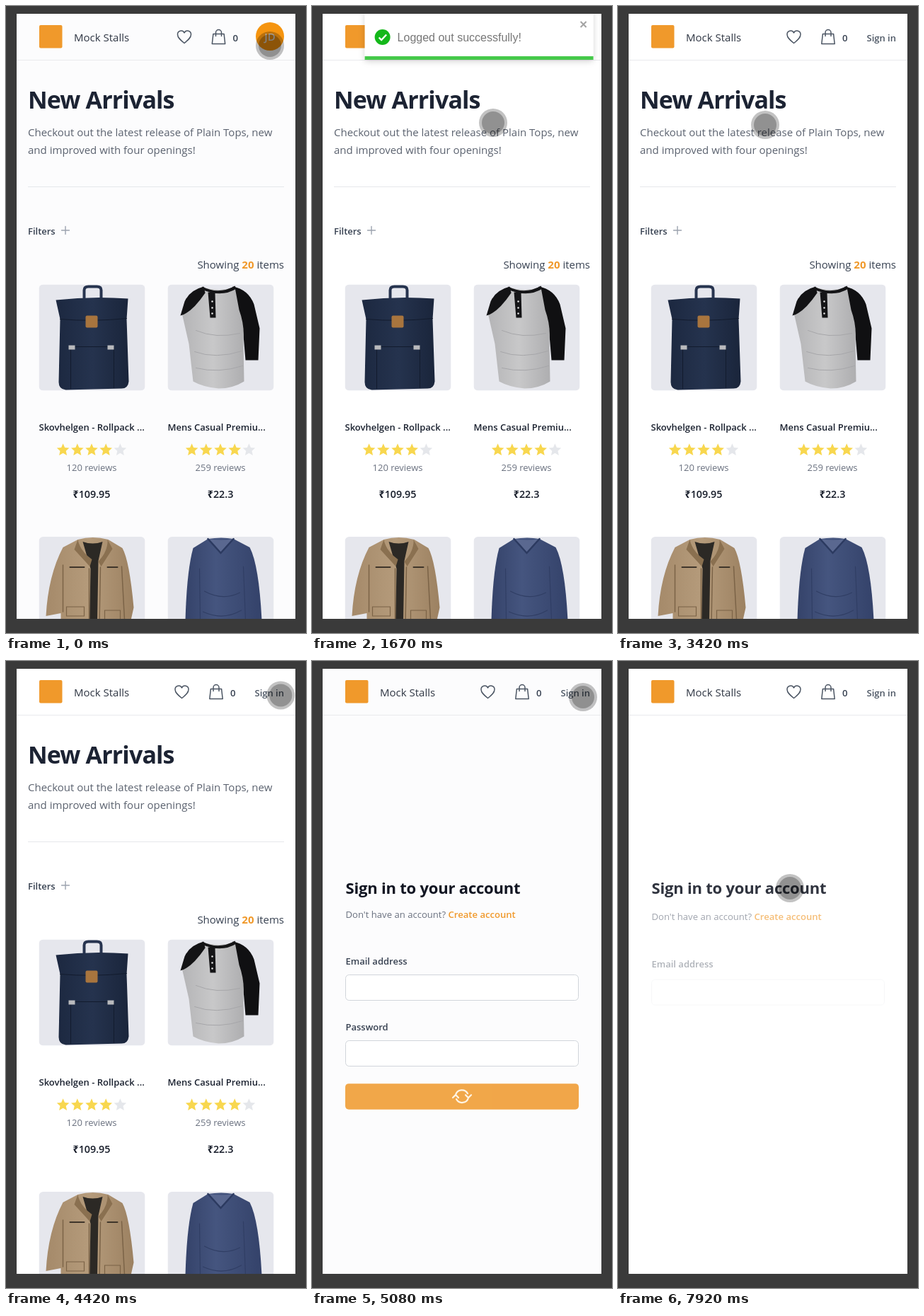
Write an HTML page that moves like this. It is 424 px wide and 886 px high and loops after 8 s.

```html
<!DOCTYPE html>
<html lang="en">
<head>
<meta charset="utf-8">
<title>Shop sign-in flow</title>
<style>
html, body { margin: 0; width: 100%; height: 100%; overflow: hidden; background: #3a3a3a; }
svg { display: block; width: 100%; height: 100%; }
text { font-family: "Open Sans", "Noto Sans", sans-serif; fill: #374151; white-space: pre; }
.semi { font-weight: 600; }
.bold { font-weight: 700; }
.mid { text-anchor: middle; }
.end { text-anchor: end; }
.line { fill: none; stroke: #4b5563; stroke-width: 1.5; stroke-linecap: round; stroke-linejoin: round; }
</style>
</head>
<body>
<svg id="stage" viewBox="0 0 424 886" preserveAspectRatio="none">
  <defs>
    <clipPath id="screen"><rect x="15" y="11" width="394" height="855"/></clipPath>
    <clipPath id="card"><rect width="150" height="150" rx="6"/></clipPath>
    <filter id="soft" x="-10%" y="-30%" width="120%" height="170%">
      <feDropShadow dx="0" dy="2" stdDeviation="4" flood-opacity=".18"/>
    </filter>
    <linearGradient id="tan"><stop stop-color="#a58a6a"/><stop offset=".5" stop-color="#b59b7b"/><stop offset="1" stop-color="#9c8161"/></linearGradient>
    <linearGradient id="grey"><stop stop-color="#b4b4b6"/><stop offset=".5" stop-color="#c8c8c9"/><stop offset="1" stop-color="#aeaeb0"/></linearGradient>
    <linearGradient id="blue"><stop stop-color="#35436a"/><stop offset=".4" stop-color="#45557f"/><stop offset="1" stop-color="#34426a"/></linearGradient>
    <linearGradient id="navy"><stop stop-color="#1c2840"/><stop offset=".5" stop-color="#25334e"/><stop offset="1" stop-color="#1a253b"/></linearGradient>
  </defs>
  <g clip-path="url(#screen)">
    <rect id="page" x="15" y="11" width="394" height="855" fill="#fff"/>
    <g id="home"></g>
    <g id="signIn"></g>
    <g id="signUp"></g>
    <g id="header"></g>
    <g id="menu"></g>
    <g id="toast"></g>
    <g id="loading"></g>
  </g>
  <g id="pointer">
    <circle r="20" fill="#000" opacity=".24"/>
    <circle r="16" fill="#000" opacity=".25"/>
  </g>
</svg>
<script>
const LOOP = 8000;
const ORANGE = '#f0992b';
const $ = id => document.getElementById(id);
const clamp = v => Math.max(0, Math.min(1, v));
const span = (t, from, to) => clamp((t - from) / (to - from));
const between = (t, from, to) => t >= from && t < to;
const show = (el, on) => el.setAttribute('display', on ? 'inline' : 'none');
const move = (el, x, y) => el.setAttribute('transform', `translate(${x} ${y})`);
const smooth = p => p * p * (3 - 2 * p);
const easeOut = p => 1 - (1 - p) ** 3;

// Interpolates rows of [time, ...values]
function follow(rows, t, ease) {
  const next = rows.findIndex(row => row[0] > t);
  if (next < 0) return rows[rows.length - 1].slice(1);
  if (next === 0) return rows[0].slice(1);
  const a = rows[next - 1], b = rows[next];
  const p = ease(span(t, a[0], b[0]));
  return a.slice(1).map((v, i) => v + (b[i + 1] - v) * p);
}

const text = (x, y, size, label, cls = '', fill = '#374151', extra = '') =>
  `<text x="${x}" y="${y}" font-size="${size}" class="${cls}" style="fill:${fill}" ${extra}>${label}</text>`;
const path = (d, fill, extra = '') => `<path d="${d}" fill="${fill}" ${extra}/>`;
const stroke = (d, color, width = 1) =>
  `<path d="${d}" fill="none" stroke="${color}" stroke-width="${width}" stroke-linecap="round"/>`;

// Header
const heart = 'M0 9C-5 5-9.5 1.5-9.5-3.2A5 5 0 0 1 0-5.6 5 5 0 0 1 9.5-3.2C9.5 1.5 5 5 0 9Z';
const bag = 'M-7.6-4.5H7.6L9.2 9.5H-9.2ZM-4-1.5V-6.5A4 4 0 0 1 4-6.5V-1.5';
$('header').innerHTML = `
  <path d="M15 76.5H409" stroke="#e9eaed"/>
  <rect x="47" y="27" width="32.5" height="32.5" rx="2" fill="${ORANGE}"/>
  ${text(96, 50, 15, 'Mock Stalls', '', '#303744')}
  <g id="icons">
    <path class="line" d="${heart}" transform="translate(248.5 43.5)"/>
    <path class="line" d="${bag}" transform="translate(297 44)"/>
    ${text(317, 49.5, 13.2, '0', 'semi')}
  </g>
  <g id="avatar">
    <circle cx="373" cy="43" r="20" fill="#f5940f"/>
    ${text(373, 49, 15, 'JD', 'mid semi', '#e4e0da')}
  </g>
  <g id="signLink">${text(393, 49.5, 13, 'Sign in', 'end semi', '#4b5563')}</g>`;

// Products
const backpack = `
  ${stroke('M64 19V8Q64 3 70 3H82Q88 3 88 8V19', '#27344f', 4)}
  ${path('M24 22Q75 16 126 20L124 49 127 137Q126 147 117 147L38 149Q28 148 28 138L30 49Z', 'url(#navy)')}
  ${stroke('M30 49Q75 53 124 48M45 88H106V146M45 88V147', '#121b2d')}
  ${path('M42 86h9v6h-9ZM97 86h9v6h-9Z', '#b9babd')}
  <rect x="66" y="44" width="17" height="17" rx="2" fill="#a8753e"/>`;
const raglan = `
  ${path('M92 3Q114 7 122 28L130 62 128 107 110 107 106 60 97 38Z', '#101012')}
  ${path('M50 4Q72 11 95 4L101 36Q109 58 107 80L108 137Q92 147 72 147 50 145 36 137L30 84 20 40 28 20Z', 'url(#grey)')}
  ${path('M51 3Q31 8 24 24L18 44Q34 40 53 12Z', '#131315')}
  ${path('M49 3Q72 15 95 2L97 6Q76 19 48 7ZM57 11h10L68 47H60Z', '#151517')}
  ${stroke('M40 65Q68 77 102 69M38 95Q68 106 105 94M40 118Q72 126 106 115', '#a6a6a9')}
  <g fill="#eee"><circle cx="63" cy="24" r="1.2"/><circle cx="63" cy="33" r="1.2"/><circle cx="63" cy="41" r="1.2"/></g>`;
const jacket = `
  ${path('M55 4Q76-2 98 4L118 16Q128 34 134 100L130 118H121V150H31V108L10 112Q13 55 34 15Z', 'url(#tan)')}
  ${path('M62 7Q76 12 90 7L84 34 82 150H71L73 45Z', '#2c2925')}
  ${path('M55 4Q58 20 75 32L72 42 50 18ZM97 4Q98 20 84 35L88 42 104 17Z', '#8a7050')}
  ${stroke('M34 40V106M117 42L121 117M71 45V150M87 43L85 150', '#7b6347', 1.5)}
  ${stroke('M44 43H64M97 43H111', '#3f352a', 2)}
  ${stroke('M39 99H64V112H39ZM93 104H115V117H93Z', '#7b6347', 1.2)}`;
const tee = `
  ${path('M57 3Q76 0 93 3L116 15Q129 40 133 118H25Q27 48 36 16Z', 'url(#blue)')}
  ${path('M58 3Q76 6 92 3L75 22Z', '#5a6890')}
  ${stroke('M57 3L75 23 93 3', '#2c3a60', 2.5)}
  ${stroke('M45 45L46 118M107 42L110 118M52 77Q78 91 102 79M50 106Q78 119 104 104', '#303e64', 1.2)}`;
const photo = (x, y, art) =>
  `<g transform="translate(${x} ${y})" clip-path="url(#card)"><rect width="150" height="150" fill="#e6e7ed"/>${art}</g>`;

const starPath = Array.from({ length: 10 }, (_, i) => {
  const r = i % 2 ? 4.3 : 9.3, a = Math.PI * (i / 5 - .5);
  return `${i ? 'L' : 'M'}${(r * Math.cos(a)).toFixed(1)} ${(r * Math.sin(a)).toFixed(1)}`;
}).join('') + 'Z';
const stars = cx => [0, 1, 2, 3, 4].map(i =>
  path(starPath, i < 4 ? '#f8d74f' : '#e5e7eb', `transform="translate(${cx + (i - 2) * 20.2} 627.5)"`)).join('');
const product = (x, art, name, reviews, price) => `
  ${photo(x, 393.5, art)}
  ${text(x, 600, 13, name, 'semi', '#1b2230')}
  ${stars(x + 74.5)}
  ${text(x + 74.5, 657, 13, reviews + ' reviews', 'mid', '#6b7280')}
  ${text(x + 74.5, 695, 14.3, '₹' + price, 'mid semi', '#151b28')}`;

$('home').innerHTML = `
  ${text(31, 145, 34, 'New Arrivals', 'bold', '#1c2333', 'letter-spacing="-.85"')}
  ${text(31, 184, 15, 'Checkout out the latest release of Plain Tops, new', '', '#5b626f')}
  ${text(31, 209, 15, 'and improved with four openings!', '', '#5b626f')}
  <path d="M31 255.5H393" stroke="#e5e7eb"/>
  ${text(31, 323, 13, 'Filters', 'semi')}
  ${stroke('M78.5 317H89.5M84 311.5V322.5', '#9ca3af', 1.4)}
  ${text(393, 371, 15, `Showing <tspan class="bold" style="fill:${ORANGE}">20</tspan> items`, 'end')}
  ${product(46.5, backpack, 'Skovhelgen - Rollpack ...', 120, '109.95')}
  ${product(228.5, raglan, 'Mens Casual Premiu...', 259, '22.3')}
  ${photo(46.5, 750, jacket)}
  ${photo(228.5, 750, tee)}`;

// Account forms: rows fade and slide in one after another
const STAGGER = 42, FADE = 180;
const field = y => `<rect x="47.5" y="${y}" width="329" height="36" rx="5" fill="#fff" stroke="#d1d5db"/>`;
const label = (y, name) => text(47.5, y, 13, name, 'semi');
const spinner = `<g class="spinner" fill="none" stroke="#fff3df" stroke-width="2.2" stroke-linecap="round" stroke-linejoin="round">
  <path d="M-9-2A9.2 9.2 0 0 1 8-4M9 2A9.2 9.2 0 0 1-8 4M-13 2L-9-2-5 2M13-2L9 2 5-2"/></g>`;

function buildForm(id, top, title, hint, link, names, action) {
  const rows = [
    text(47.5, top + 8, 22, title, 'bold', '#111522', 'letter-spacing="-.2"'),
    text(47.5, top + 42, 13.1, `${hint} <tspan class="semi" style="fill:${ORANGE}">${link}</tspan>`, '', '#6b7280'),
  ];
  names.forEach((name, i) => {
    const y = top + 93 * i;
    rows.push(label(y + 107.5, name), field(y + 122.5));
  });
  const y = top + 93 * names.length + 89;
  rows.push(`<rect x="47" y="${y}" width="330" height="36.5" rx="5" fill="${ORANGE}"/>
    <g class="action">${text(212, y + 23, 13, action, 'mid semi', '#fff')}</g>${spinner}`);
  $(id).innerHTML = rows.map(row => `<g>${row}</g>`).join('');
  const nodes = [...$(id).children];
  const spin = $(id).querySelector('.spinner'), caption = $(id).querySelector('.action');
  return (t, start, end, busyUntil) => {
    const on = between(t, start, end);
    show($(id), on);
    if (!on) return;
    nodes.forEach((node, i) => {
      const p = span(t - start - STAGGER * i, 0, FADE);
      node.setAttribute('opacity', p);
      move(node, 0, (i ? 8 : -3) * (1 - p));
    });
    const busy = t < busyUntil;
    show(spin, busy);
    show(caption, !busy);
    spin.setAttribute('transform', `translate(212 ${y + 18}) rotate(${(t - 5080) * .36})`);
  };
}
const drawSignIn = buildForm('signIn', 321, 'Sign in to your account', "Don't have an account?",
  'Create account', ['Email address', 'Password'], 'Sign in');
const drawSignUp = buildForm('signUp', 277, 'Create your account', 'Already have an account?',
  'Sign in', ['Full name', 'Email address', 'Password'], 'Create account');

// Overlays
$('menu').innerHTML = `<rect x="201" y="71" width="192" height="116" rx="6" fill="#fff" filter="url(#soft)"/>
  ${['Your Profile', 'Settings', 'Sign out'].map((s, i) => text(217, 98 + 36 * i, 13.1, s)).join('')}`;

$('toast').innerHTML = `
  <rect x="70" y="5" width="323" height="71" rx="3" fill="#fff" filter="url(#soft)"/>
  <circle cx="95" cy="44" r="11" fill="#14b81a"/>
  <path d="M90 44.5L93.5 48 100.5 40.5" fill="none" stroke="#fff" stroke-width="2.4"/>
  <text x="116" y="49.5" font-size="16" style="font-family:'Liberation Sans',sans-serif;fill:#777">Logged out successfully!</text>
  <path d="M375 22L383 30M383 22L375 30" stroke="#a3a3a3" stroke-width="2"/>
  <rect id="progress" x="70" y="71" width="323" height="5" fill="#45c94a"/>`;

$('loading').innerHTML = `<rect x="15" y="11" width="394" height="855" fill="#000" opacity=".465"/>
  ${[1, 1, .5].map((o, i) => `<rect class="bar" x="${202.3 + 8 * i}" width="3.6" rx="1.5" fill="#fff" opacity="${o}"/>`).join('')}`;
const bars = [...document.querySelectorAll('.bar')];

// Pointer stops: [time, x, y]
const GRAB = 2080, RELEASE = 2560, GRAB_X = 145;
const stops = [
  [0, 373, 56], [250, 373, 56], [800, 256, 165], [1700, 256, 165], [GRAB, GRAB_X, 48],
  [2520, 412, 50], [2640, 412, 50], [3250, 208, 168], [3450, 208, 168],
  [4150, 390, 47], [4830, 385, 51], [5080, 383, 51], [5350, 383, 51], [6000, 278, 362],
  [6600, 278, 362], [7400, 243, 321], [LOOP, 243, 321],
];

// The toast bounces in, then is swiped away to the right
const TOAST_IN = 1093, TOAST_REST = TOAST_IN + 750;
const bounce = [[0, 3000], [.6, -25], [.75, 10], [.9, -5], [1, 0]];
function drawToast(t, pointerX) {
  show($('toast'), between(t, TOAST_IN, RELEASE));
  const drag = t >= GRAB ? Math.max(0, pointerX - GRAB_X) : 0;
  const [enter] = follow(bounce, span(t, TOAST_IN, TOAST_REST), easeOut);
  move($('toast'), enter + drag, 0);
  $('toast').setAttribute('opacity', clamp(1 - drag / 258));
  $('progress').setAttribute('width', 323 * (1 - span(t, TOAST_REST, TOAST_REST + 5000)));
}

const OPEN_SIGN_IN = 4675, OPEN_SIGN_UP = 6330, BACK_TO_SIGN_IN = 7765;
function draw(t) {
  const loggedIn = t < 1090;
  $('page').setAttribute('fill', t < 400 || between(t, 5000, 5500) ? '#fcfcfd' : '#fff');
  show($('home'), t < OPEN_SIGN_IN);
  show($('avatar'), loggedIn);
  show($('signLink'), !loggedIn);
  move($('icons'), loggedIn ? 3.5 : 0, 0);
  show($('menu'), between(t, 250, 1000));

  if (t < OPEN_SIGN_UP) drawSignIn(t, OPEN_SIGN_IN, OPEN_SIGN_UP, 5300);
  else drawSignIn(t, BACK_TO_SIGN_IN, LOOP, 0);
  drawSignUp(t, OPEN_SIGN_UP, BACK_TO_SIGN_IN, 0);

  show($('loading'), between(t, OPEN_SIGN_IN - 80, 5000));
  bars.forEach((bar, i) => {
    const phase = ((t - 4830 + (i - 1) * 200 + LOOP * 3) % 600) / 300;
    const h = 48 - 44 * (1 - Math.abs(1 - phase));
    bar.setAttribute('height', h);
    bar.setAttribute('y', 439 - h / 2);
  });

  const [x, y] = follow(stops, t, smooth);
  drawToast(t, x);
  move($('pointer'), x, y);
}

const begin = performance.now();
function tick() {
  draw((performance.now() - begin) % LOOP);
  requestAnimationFrame(tick);
}
tick();
</script>
</body>
</html>
```
